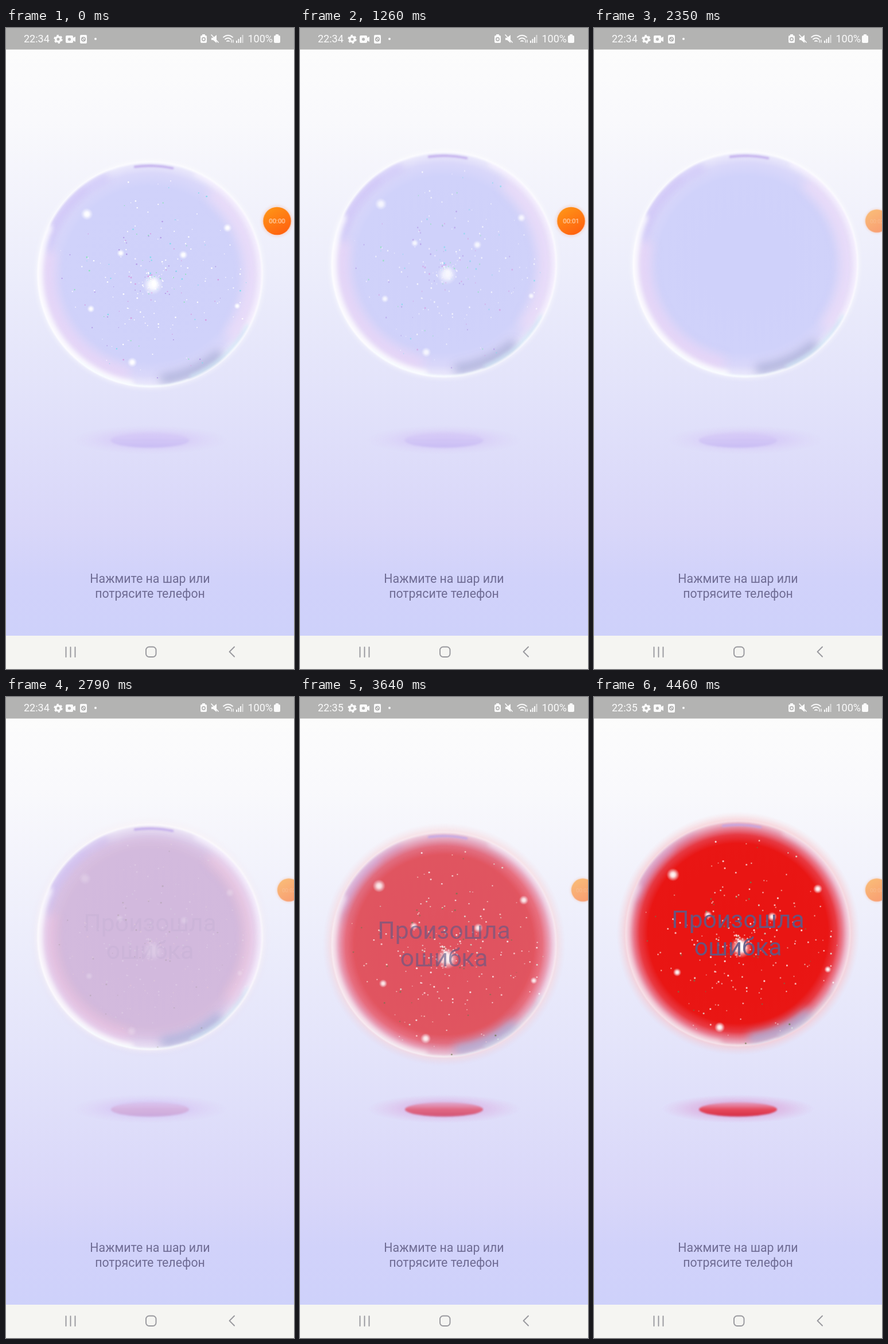
These frames come from a looping animation (502x1116 px, 4.49 s). An HTML page:

```html
<!DOCTYPE html>
<html lang="ru">
<head>
<meta charset="utf-8">
<title>Шар</title>
<style>
  html, body { margin: 0; width: 100%; height: 100%; overflow: hidden; background: #fff; }
  svg { display: block; width: 100vw; height: 100vh; }
  text { font-family: Roboto, "Noto Sans", sans-serif; }
  .mid { text-anchor: middle; }
  .line { fill: none; stroke-linecap: round; stroke-linejoin: round; }
</style>
</head>
<body>
<svg viewBox="0 0 502 1116" preserveAspectRatio="none">
  <defs>
    <linearGradient id="sky" x2="0" y2="1">
      <stop offset="0" stop-color="#fcfcfc"/>
      <stop offset=".12" stop-color="#f9f9fc"/>
      <stop offset=".4" stop-color="#ebecfb"/>
      <stop offset=".62" stop-color="#e1e1fa"/>
      <stop offset=".81" stop-color="#d9d7f9"/>
      <stop offset=".9" stop-color="#d1d2fa"/>
      <stop offset="1" stop-color="#ced1fa"/>
    </linearGradient>
    <radialGradient id="glass">
      <stop offset="0" stop-color="#cfd1fa"/>
      <stop offset=".78" stop-color="#d0d2fa"/>
      <stop offset=".9" stop-color="#dad8fa"/>
      <stop offset=".97" stop-color="#e8e6fb"/>
      <stop offset="1" stop-color="#f2f2fd"/>
    </radialGradient>
    <radialGradient id="alarm">
      <stop offset="0" stop-color="#e91210"/>
      <stop offset=".74" stop-color="#e91412"/>
      <stop offset=".81" stop-color="#ea1c20" stop-opacity=".85"/>
      <stop offset=".88" stop-color="#ec4858" stop-opacity=".5"/>
      <stop offset=".94" stop-color="#f6a0a8" stop-opacity=".3"/>
      <stop offset="1" stop-color="#fcc" stop-opacity="0"/>
    </radialGradient>
    <radialGradient id="glow">
      <stop offset="0" stop-color="#fff"/>
      <stop offset=".35" stop-color="#fff" stop-opacity=".85"/>
      <stop offset="1" stop-color="#f0f2ff" stop-opacity="0"/>
    </radialGradient>
    <radialGradient id="mist">
      <stop offset="0" stop-color="#cdb9f6" stop-opacity=".7"/>
      <stop offset=".5" stop-color="#d3c3f6" stop-opacity=".5"/>
      <stop offset="1" stop-color="#dccff8" stop-opacity="0"/>
    </radialGradient>
    <radialGradient id="mistRed">
      <stop offset="0" stop-color="#e58ab8" stop-opacity=".6"/>
      <stop offset=".6" stop-color="#e2a5d4" stop-opacity=".4"/>
      <stop offset="1" stop-color="#e2b5e0" stop-opacity="0"/>
    </radialGradient>
    <linearGradient id="spot" x2="0" y2="1">
      <stop offset="0" stop-color="#d6c9f6" stop-opacity=".5"/>
      <stop offset="1" stop-color="#c9bdf4"/>
    </linearGradient>
    <linearGradient id="spotRed" x2="0" y2="1">
      <stop offset="0" stop-color="#e88cac" stop-opacity=".7"/>
      <stop offset=".5" stop-color="#e74658"/>
      <stop offset="1" stop-color="#d62c44"/>
    </linearGradient>
    <linearGradient id="orange" x2=".6" y2="1">
      <stop offset="0" stop-color="#ff9a18"/>
      <stop offset="1" stop-color="#ff6410"/>
    </linearGradient>
    <filter id="soft" x="-20%" y="-40%" width="140%" height="180%"><feGaussianBlur stdDeviation="1.6"/></filter>
    <clipPath id="inside"><circle r="196"/></clipPath>
  </defs>

  <rect y="37" width="502" height="1021" fill="url(#sky)"/>

  <g id="mists">
    <ellipse cx="251" cy="717" rx="134" ry="25" fill="url(#mist)"/>
    <ellipse id="mistAlarm" cx="251" cy="717" rx="134" ry="25" fill="url(#mistRed)"/>
  </g>
  <ellipse cx="251" cy="718" rx="68" ry="12.5" fill="url(#spot)" filter="url(#soft)"/>
  <ellipse id="spotAlarm" cx="251" cy="718" rx="68" ry="12.5" fill="url(#spotRed)" filter="url(#soft)"/>

  <g id="sway"><g id="bob">
    <circle r="199" fill="#fff" opacity=".5" style="filter:blur(4px)"/>
    <circle r="196" fill="url(#glass)"/>
    <g id="tints" clip-path="url(#inside)"></g>
    <circle id="red" r="212" fill="url(#alarm)"/>
    <g id="shades" clip-path="url(#inside)"></g>
    <g id="shine">
      <g id="rims" clip-path="url(#inside)"></g>
      <circle r="195.5" fill="none" stroke="#fff" stroke-width="3" opacity=".6" style="filter:blur(1px)"/>
    </g>
    <g id="idleStars"></g>
    <g id="alarmStars"></g>
    <g id="message" class="mid" font-size="42.6" fill="#5f5a86">
      <text y="-10">Произошла</text>
      <text y="38">ошибка</text>
    </g>
  </g></g>

  <g class="mid" font-size="21.3" fill="#6f6c94">
    <text x="251" y="966">Нажмите на шар или</text>
    <text x="251" y="991.5">потрясите телефон</text>
  </g>

  <g id="bubble">
    <circle r="27" fill="#f6b9a0" opacity=".4" style="filter:blur(2px)"/>
    <circle r="24.3" fill="url(#orange)"/>
    <g id="timer" class="mid" font-size="11.5" fill="#fff"></g>
  </g>

  <rect width="502" height="37.5" fill="#b3b3b2"/>
  <g fill="#fafafa">
    <g id="clock" font-size="18"></g>
    <g fill="none" stroke="#fafafa">
      <circle cx="91" cy="19.5" r="4.3" stroke-width="3.6"/>
      <circle cx="91" cy="19.5" r="6.4" stroke-width="2.6" stroke-dasharray="3.35"/>
    </g>
    <path d="M106 13h9q2 0 2 2v2l4-2v9l-4-2v2q0 2-2 2h-9q-2 0-2-2v-9q0-2 2-2z"/>
    <circle cx="110.5" cy="19.5" r="2.6" fill="#b5b5b5"/>
    <rect x="129" y="12" width="12" height="15" rx="2"/>
    <circle cx="135" cy="19.5" r="3.2" class="line" stroke="#a8a8a8" stroke-width="1.5"/>
    <path d="M133 17l4 5" class="line" stroke="#a8a8a8" stroke-width="1.3"/>
    <circle cx="156" cy="19" r="2"/>
    <path d="M342 11h5v2h1q2 0 2 2v9q0 2-2 2h-7q-2 0-2-2v-9q0-2 2-2h1z"/>
    <circle cx="344.5" cy="19.5" r="2.7" class="line" stroke="#aaa" stroke-width="1.4"/>
    <path d="M358 17h3l6-5v14l-6-5h-3z"/>
    <path d="M358 12l12 13" class="line" stroke="#fafafa" stroke-width="1.7"/>
    <g class="line" stroke="#fafafa" stroke-width="1.9">
      <path d="M379 16q8-6.500 16 0M382 19.500q5-4 10 0M385 23q2-1.600 4 0"/>
      <path d="M393 25v-4M396 21v4" stroke-width="1.4"/>
    </g>
    <path d="M401 22h2v4h-2zM404.500 19h2v7h-2zM408 16h2v10h-2z"/>
    <path d="M411.500 12h2v14h-2z" opacity=".6"/>
    <text x="421.500" y="25" font-size="18">100%</text>
    <path d="M470 11h5v2h1q2 0 2 2v9q0 2-2 2h-7q-2 0-2-2v-9q0-2 2-2h1z"/>
  </g>

  <rect y="1058" width="502" height="58" fill="#f5f5f2"/>
  <g class="line" stroke="#98989d" stroke-width="1.9">
    <path d="M104.500 1078v17M112.500 1078v17M120.500 1078v17"/>
    <rect x="244" y="1077.500" width="17.500" height="17.500" rx="5.500"/>
    <path d="M398 1077.500l-8.500 8.500 8.500 8.500"/>
  </g>
</svg>

<script>
const LOOP = 4490;
const SINE = 'cubic-bezier(.37,0,.63,1)';
const $ = id => document.getElementById(id);

function add(parent, tag, attrs, text) {
  const el = document.createElementNS('http://www.w3.org/2000/svg', tag);
  for (const k in attrs) el.setAttribute(k, attrs[k]);
  if (text) el.textContent = text;
  parent.appendChild(el);
  return el;
}

// Steps are [ms, value] pairs, held before the first and after the last.
function play(el, prop, steps, easing = 'linear') {
  const all = [[0, steps[0][1]], ...steps, [LOOP, steps[steps.length - 1][1]]];
  const anim = el.animate(
    all.map(([t, v]) => ({ offset: t / LOOP, [prop]: v, easing })),
    { duration: LOOP, iterations: Infinity });
  anim.startTime = 0;
}
const fade = (id, steps) => play($(id), 'opacity', steps);
const move = (id, steps, place) =>
  play($(id), 'transform', steps.map(([t, v]) => [t, place(v)]), SINE);

// Shows each label from its time until the next one.
function labels(parent, attrs, list) {
  list.forEach(([from, text], i) => {
    const el = add(parent, 'text', attrs, text);
    const to = i + 1 < list.length ? list[i + 1][0] : LOOP;
    const steps = from ? [[0, 0], [from, 1]] : [[0, 1]];
    if (to < LOOP) steps.push([to, 0]);
    play(el, 'opacity', steps, 'steps(1, end)');
  });
}

// Blurred arc, angles in degrees clockwise from the right.
function arc(parent, r, from, to, width, blur, color, opacity) {
  const at = a => [Math.cos(a * Math.PI / 180) * r, Math.sin(a * Math.PI / 180) * r].join(' ');
  add(parent, 'path', {
    d: `M${at(from)}A${r} ${r} 0 0 1 ${at(to)}`, class: 'line', stroke: color,
    'stroke-width': width, opacity, style: `filter:blur(${blur}px)`
  });
}

const tints = $('tints'), shades = $('shades'), rims = $('rims');
arc(tints, 178, 105, 190, 24, 9, '#ead4f6', .75);
arc(tints, 178, -50, 35, 26, 9, '#ecdcf8', .8);
arc(tints, 186, 195, 245, 16, 7, '#c8bef8', .6);
arc(shades, 187, 200, 232, 8, 6, '#c9b8f4', .4);
arc(shades, 184, 50, 82, 17, 8, '#a9aed8', .9);
arc(shades, 189, 262, 282, 4, 1.8, '#bda6ea', .8);
arc(rims, 193, 100, 205, 10, 4, '#fff', .9);
arc(rims, 193, -65, 30, 9, 4, '#f8f2ff', .8);
arc(rims, 192, 28, 68, 6, 3, '#cdeaf6', .7);
arc(rims, 196, 70, 130, 4, 2, '#eefaff', .85);

const BIG = [[-110, -105, 11], [135, -81, 8], [-51, -37, 7], [58, -34, 8],
  [5, 18, 18], [-103, 60, 7], [152, 55, 6], [-31, 153, 9]];

function stars(parent, colors, size) {
  let seed = 41;
  const rand = () => (seed = seed * 16807 % 2147483647) / 2147483647;
  for (let i = 0; i < 260; i++) {
    const a = rand() * Math.PI * 2, r = 178 * rand() ** 1.3;
    add(parent, 'circle', {
      cx: (Math.cos(a) * r + 3).toFixed(1), cy: (Math.sin(a) * r + 8).toFixed(1),
      r: (size * (.5 + rand() * .6)).toFixed(2),
      fill: colors[Math.floor(rand() * colors.length)]
    });
  }
  for (const [cx, cy, r] of BIG) add(parent, 'circle', { cx, cy, r, fill: 'url(#glow)' });
  add(parent, 'ellipse', { cx: 7, cy: 16, rx: 8, ry: 13, fill: 'url(#glow)' });
}
stars($('idleStars'), ['#fff', '#fff', '#fff', '#f4f0ff', '#86e6b4', '#d69be0', '#7fdcec', '#b39ae6'], 1.25);
stars(add($('alarmStars'), 'g', { transform: 'translate(0 6) scale(1.03)' }),
  ['#fff', '#fff', '#fff', '#fdeedd', '#ffd9d9', '#dff5e8', '#6f7a50'], 1.3);

labels($('clock'), { x: 31, y: 25 }, [[0, '22:34'], [3300, '22:35']]);
labels($('timer'), { y: 4.3 }, [0, 1, 2, 3, 4].map(s => [s * 1000, '00:0' + s]));

const shift = [[1560, 0], [1720, 13], [2400, 13], [2600, 0]];
move('sway', shift, x => `translate(${251 + x}px, 0px)`);
move('mists', shift, x => `translate(${x}px, 0px)`);
move('bob', [[0, 429], [800, 411.5], [2350, 411.5], [3500, 432], [4490, 411.5]],
  y => `translate(0px, ${y}px)`);
// The bubble shrinks as it docks at the screen edge.
move('bubble', [[1560, 0], [1900, 1]],
  p => `translate(${472.5 + 20.5 * p}px, 336px) scale(${1 - .17 * p})`);

const blush = [[2620, 0], [3140, .38], [3640, .66], [4460, .99]];
fade('red', blush);
fade('mistAlarm', blush);
fade('spotAlarm', [[2620, 0], [3140, .42], [3640, .72], [4460, .98]]);
fade('shine', [[2620, 1], [3140, .75], [4460, .55]]);
fade('message', [[2720, 0], [3140, .27], [3640, .62], [4460, .92]]);
fade('idleStars', [[1150, 1], [1730, .12], [1850, 0]]);
fade('alarmStars', [[2620, 0], [3140, .72], [3640, .92], [4460, 1]]);
fade('bubble', [[1500, 1], [1700, .58]]);
fade('timer', [[1450, .8], [1700, .3], [2300, .2]]);
</script>
</body>
</html>
```
